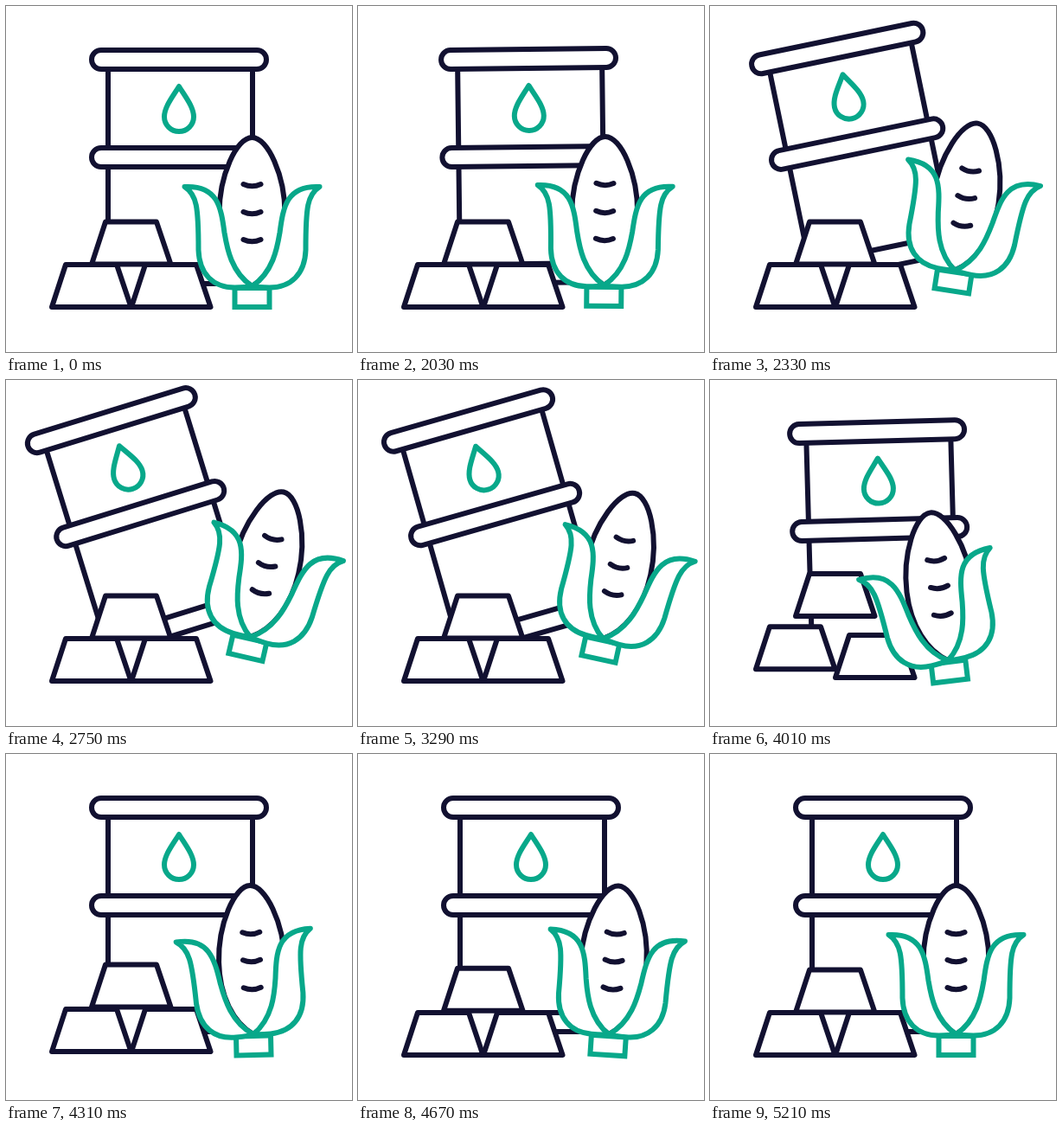
These frames come from a looping animation (400x400 px, 5240 ms). An HTML page with a canvas:

```html
<!DOCTYPE html>
<html lang="en">
<head>
<meta charset="utf-8">
<title>Commodities</title>
<style>
  html, body { margin: 0; width: 100%; height: 100%; overflow: hidden; background: #fff; }
  canvas { display: block; width: 400px; height: 400px; }
</style>
</head>
<body>
<canvas id="stage"></canvas>
<script>
const LOOP = 5240, STEP = 30;
const DARK = '#121131', GREEN = '#08a88a';
const START = 2000, PEAK = 3080, HIT = 3760;
const TILT = 18;

const canvas = document.getElementById('stage');
const ctx = canvas.getContext('2d');
const dpr = window.devicePixelRatio || 1;
canvas.width = canvas.height = 400 * dpr;

const rad = deg => deg * Math.PI / 180;

function bezierEase(x1, y1, x2, y2) {
  const at = (s, a, b) => 3 * s * (1 - s) ** 2 * a + 3 * s * s * (1 - s) * b + s ** 3;
  return x => {
    let lo = 0, hi = 1;
    for (let i = 0; i < 24; i++) {
      const mid = (lo + hi) / 2;
      if (at(mid, x1, x2) < x) lo = mid; else hi = mid;
    }
    return at(lo, y1, y2);
  };
}
const riseEase = bezierEase(0.18, 0.2, 0.18, 1);

// Smooth curve through [time, value] keys, flat at turning points.
function track(keys) {
  const slope = i => {
    const a = keys[i - 1], b = keys[i], c = keys[i + 1];
    if (!a || !c || (b[1] - a[1]) * (c[1] - b[1]) <= 0) return 0;
    return (c[1] - a[1]) / (c[0] - a[0]);
  };
  return t => {
    if (t <= keys[0][0]) return keys[0][1];
    for (let i = 0; i < keys.length - 1; i++) {
      const [t0, v0] = keys[i], [t1, v1] = keys[i + 1];
      if (t > t1) continue;
      const h = t1 - t0, u = (t - t0) / h;
      return v0 + (v1 - v0) * u * u * (3 - 2 * u)
        + slope(i) * h * u * (1 - u) ** 2
        - slope(i + 1) * h * u * u * (1 - u);
    }
    return keys[keys.length - 1][1];
  };
}

const coreFall = track([[3080, 13.6], [3590, 7.2], [4030, -6.9], [4580, 4], [5200, 0]]);
const leafFall = track([[3080, 17.4], [3590, 8.8], [4060, -14.3], [4610, 5.3], [5200, 0]]);
const slideFall = track([[3080, -7.9], [3590, -4], [4060, -6.5], [4310, 2], [4610, 4], [5200, 0]]);

function hop(t, from, to, height) {
  const u = (t - from) / (to - from);
  return u > 0 && u < 1 ? 4 * height * u * (1 - u) : 0;
}

function push(t) {
  if (t <= START || t >= HIT) return 0;
  if (t < PEAK) return TILT * riseEase((t - START) / (PEAK - START));
  return TILT * (1 - ((t - PEAK) / (HIT - PEAK)) ** 1.85);
}

function cornPose(t, p) {
  const lift = 1.6 * p;
  if (t < PEAK) return { core: 0.755 * p, leaf: 0.965 * p, slide: -0.44 * p, lift };
  return { core: coreFall(t), leaf: leafFall(t), slide: slideFall(t), lift };
}

function paint(path, color, fill = true) {
  if (fill) {
    ctx.fillStyle = '#fff';
    ctx.fill(path);
  }
  ctx.strokeStyle = color;
  ctx.stroke(path);
}

const shape = d => new Path2D(d);

const bodySide = shape('M118 62V310H285V62Z');
const drop = shape('M200 93C208 106 217 117 217 128A17 17 0 0 1 183 128C183 117 192 106 200 93Z');
const bar = shape('M16 0H75L91.5 49H0Z');
const gap = shape('M124 293H166L144 348Z');
const kernel = shape('M0 -172C-18 -172 -38 -128 -38 -84C-38 -45 -23 -14 0 0C23 -14 38 -45 38 -84C38 -128 18 -172 0 -172Z');
const stub = shape('M-20 2H20V24H-20Z');
const grain = shape('M-10 0Q0 4.5 10 0');
const leaf = shape('M0 0C-24 -16 -29 -44 -32 -62C-36 -92 -40 -117 -78 -115C-64 -106 -62 -92 -62 -42C-61 -14 -45 1.5 -20 1.5C-11 1.5 -5 1 0 0Z');

function ring(y) {
  const path = new Path2D();
  path.arc(110, y, 11, Math.PI / 2, Math.PI * 1.5);
  path.arc(290, y, 11, -Math.PI / 2, Math.PI / 2);
  path.closePath();
  return path;
}
const rings = [62, 175, 310].map(ring);

function drawBarrel(angle) {
  ctx.save();
  ctx.translate(110, 313);
  ctx.rotate(-rad(angle));
  ctx.translate(-110, -313);
  paint(bodySide, DARK);
  rings.forEach(r => paint(r, DARK));
  paint(drop, GREEN);
  ctx.restore();
}

function drawBar(x, y) {
  ctx.save();
  ctx.translate(x, y);
  paint(bar, DARK);
  ctx.restore();
}

function drawGold(t) {
  const top = hop(t, 3770, 4200, 26) + hop(t, 4200, 4450, 6.2) + hop(t, 4450, 4800, 2);
  const left = hop(t, 3770, 4200, 14) + hop(t, 4200, 4450, 4);
  const right = hop(t, 3770, 4200, 4) + hop(t, 4200, 4450, 4);
  ctx.fillStyle = '#fff';
  ctx.fill(gap);
  drawBar(53, 299 - left);
  drawBar(145, 299 - right);
  drawBar(99, 249.6 - top);
}

function drawCorn(pose) {
  ctx.save();
  ctx.translate(284.5 + pose.slide, 348 - pose.lift);
  ctx.rotate(rad(pose.core));
  ctx.translate(0, -24);
  paint(kernel, DARK);
  for (let i = 0; i < 3; i++) {
    ctx.save();
    ctx.translate(0, -118 + 32 * i);
    paint(grain, DARK, false);
    ctx.restore();
  }
  ctx.lineJoin = 'miter';
  paint(stub, GREEN);
  ctx.lineJoin = 'round';
  ctx.rotate(rad(pose.leaf - pose.core));
  paint(leaf, GREEN);
  ctx.scale(-1, 1);
  paint(leaf, GREEN);
  ctx.restore();
}

function draw(t) {
  ctx.setTransform(dpr, 0, 0, dpr, 0, 0);
  ctx.fillStyle = '#fff';
  ctx.fillRect(0, 0, 400, 400);
  ctx.lineWidth = 6;
  ctx.lineJoin = ctx.lineCap = 'round';
  const p = push(t);
  drawBarrel(p + hop(t, HIT, 4170, 1.65));
  drawGold(t);
  drawCorn(cornPose(t, p));
}

const begin = performance.now();
function frame() {
  const t = (performance.now() - begin) % LOOP;
  draw(Math.floor((t + 10) / STEP) * STEP - 10);
  requestAnimationFrame(frame);
}
frame();
</script>
</body>
</html>
```
